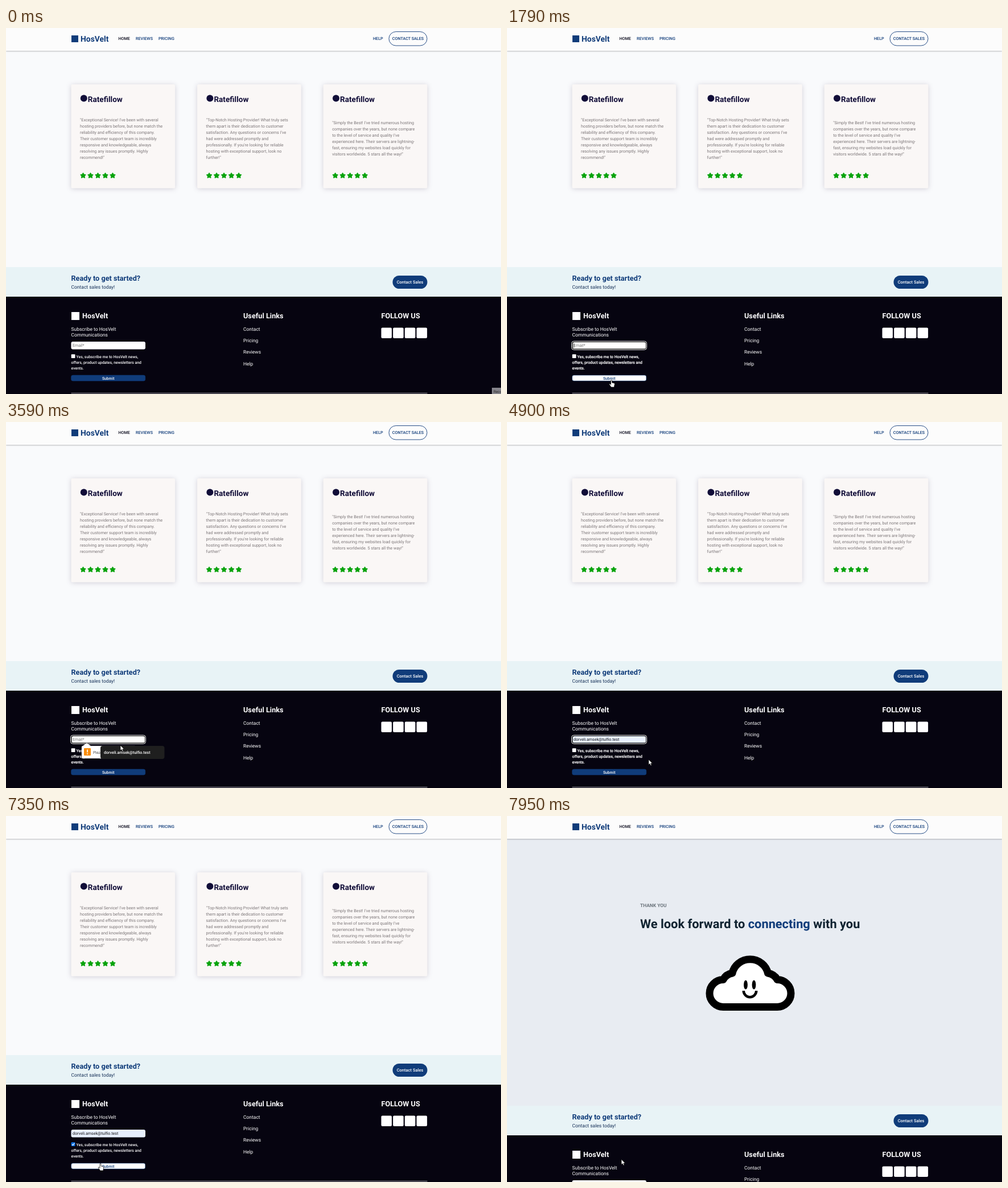
Animation, 870 px wide and 643 px high, one loop 8 s. Source, as an HTML page:

```html
<!DOCTYPE html>
<html lang="en">
<head>
<meta charset="utf-8">
<title>Sign-up form</title>
<style>
  html, body { margin: 0; width: 100%; height: 100%; overflow: hidden; background: #f9fafc; }
  svg { display: block; font-family: Roboto, sans-serif; text-rendering: geometricPrecision; }
  .blue { fill: #103c7a; }
  .white { fill: #fff; }
  .nav { font-size: 7.2px; font-weight: 500; }
  .brand { font-size: 13.9px; font-weight: 700; }
  .title { font-size: 12.7px; font-weight: 700; }
  .body { font-size: 8.48px; }
  .review { font-size: 7.3px; fill: #7c7678; }
  .label { font-size: 6.85px; font-weight: 500; stroke: #fff; stroke-width: 0; }
  .field { font-size: 7.1px; }
  .card { fill: #faf7f6; filter: drop-shadow(0 1px 4px #2d143830); }
  #header rect:first-child { filter: drop-shadow(0 1px 1px #0004); }
</style>
</head>
<body>
<svg width="870" height="643" viewBox="0 0 870 643">
  <rect width="870" height="643" fill="#f9fafc"/>
  <g id="cards"></g>

  <g id="thanks">
    <rect y="40" width="870" height="470" fill="#e8ecf2"/>
    <g id="message">
      <text x="234" y="160" font-size="8.4" font-weight="700" fill="#6c757d">THANK YOU</text>
      <text x="234" y="197" font-size="21.8" font-weight="700" fill="#0f2230">We look forward to <tspan class="blue">connecting</tspan> with you</text>
    </g>
    <g id="cloud" stroke="#000" fill="none">
      <path d="M380 335.5a24 24 0 0 1 0-48Q385 278 396 276A32 31 0 0 1 458.5 276Q470 278 475 287.5a24 24 0 0 1 0 48Z" fill="#fff" stroke-width="13" stroke-linejoin="round"/>
      <path d="M415.8 307a11.2 11.2 0 0 0 22.4 0" stroke-width="4.5"/>
      <g fill="#000" stroke="none">
        <ellipse cx="419.5" cy="296.5" rx="3.4" ry="8"/>
        <ellipse cx="434" cy="296.5" rx="3.4" ry="8"/>
      </g>
    </g>
  </g>

  <g id="header">
    <rect width="870" height="40" fill="#fcfcfc"/>
    <rect class="blue" x="115" y="13" width="12" height="12"/>
    <text class="blue brand" x="131" y="24">HosVelt</text>
    <g class="blue nav">
      <text x="197.5" y="21.4" fill="#0a0a1c">HOME</text>
      <text x="228" y="21.4">REVIEWS</text>
      <text x="268" y="21.4">PRICING</text>
      <text x="645" y="21.4">HELP</text>
      <text x="706.5" y="21.4" text-anchor="middle">CONTACT SALES</text>
    </g>
    <rect x="673" y="6.5" width="67" height="24.5" rx="12.2" fill="none" stroke="#103c7a" stroke-width=".9"/>
  </g>

  <g id="lower">
    <rect y="420" width="870" height="52" fill="#e8f3f6"/>
    <text class="blue title" x="114.5" y="444">Ready to get started?</text>
    <text class="body" x="114.5" y="458" fill="#163058">Contact sales today!</text>
    <rect class="blue" x="679.5" y="435" width="61" height="23" rx="11.5"/>
    <text class="white" x="710" y="449.4" font-size="7.5" font-weight="500" text-anchor="middle">Contact Sales</text>

    <rect y="472" width="870" height="171" fill="#060410"/>
    <g class="white">
      <rect x="115" y="499" width="14" height="14"/>
      <text class="title" x="134" y="510.3">HosVelt</text>
      <text class="title" x="417" y="510.3">Useful Links</text>
      <text class="title" x="659.5" y="510.3">FOLLOW US</text>
      <g class="body">
        <text x="114.5" y="531.7">Subscribe to HosVelt</text>
        <text x="114.5" y="541.5">Communications</text>
        <text x="417" y="531.7">Contact</text>
        <text x="417" y="552">Pricing</text>
        <text x="417" y="572.3">Reviews</text>
        <text x="417" y="592.6">Help</text>
      </g>
      <g id="social"></g>
      <g class="label" id="label">
        <text x="123.5" y="580">Yes, subscribe me to HosVelt news,</text>
        <text x="114.5" y="590">offers, product updates, newsletters and</text>
        <text x="114.5" y="600">events.</text>
      </g>
    </g>

    <rect id="ring" x="113.5" y="550.3" width="132" height="15" rx="4" fill="#000" stroke="#fff"/>
    <rect id="input" x="114.5" y="551" width="130.5" height="13.5" rx="3"/>
    <text id="value" class="field" x="117" y="560.2"></text>
    <rect id="caret" y="554" width=".7" height="8"/>

    <rect id="box" x="114.7" y="573.2" width="6.8" height="6.8" rx="1"/>
    <path id="tick" d="M116 576.6l1.6 1.7 2.7-3.4" fill="none" stroke="#fff" stroke-width="1.1"/>

    <rect id="button" x="114.6" y="610" width="130.2" height="10" rx="3" stroke="#103c7a" stroke-width=".6"/>
    <text id="submit" x="179.7" y="617.5" font-size="6.8" font-weight="500" text-anchor="middle">Submit</text>
    <rect x="114.5" y="641" width="626" height="1" fill="#9c9ba2"/>
  </g>

  <g id="warning">
    <path class="white" d="M135 569l7-5 7 5h77a2 2 0 0 1 2 2v18a2 2 0 0 1-2 2h-91a2 2 0 0 1-2-2v-18a2 2 0 0 1 2-2z" stroke="#999" stroke-width=".4"/>
    <rect x="137" y="573" width="12" height="13" rx="1" fill="#f88d0c"/>
    <path d="M143 575.5v5M143 582v1.8" stroke="#fff" stroke-width="1.7"/>
    <text x="153" y="582.5" font-size="6.6" font-family="Open Sans, sans-serif" fill="#333">Please fill out this field.</text>
  </g>
  <g id="suggestion">
    <rect x="166" y="569" width="112.5" height="23" rx="4" fill="#1f1f1f"/>
    <rect id="row" x="167" y="573" width="109" height="15" fill="#3b3b3d"/>
    <text id="offer" class="field white" x="172" y="583" font-weight="500"></text>
  </g>

  <g id="recorder">
    <rect x="854" y="632" width="16" height="11" fill="#85848b"/>
    <text x="857" y="641" font-size="6.4" fill="#222">Reco</text>
  </g>

  <g id="cursor" stroke-linejoin="round">
    <path id="arrow" d="M0 0v9.2l2.1-1.9 1.5 3.3 1.6-.7-1.4-3.2h2.9z" fill="#fff" stroke="#000" stroke-width=".7"/>
    <path id="hand" d="M-1 0q1-1.4 2 0v4l4 1q1 .4.8 2l-.8 3.5v1.5h-5.5l-3.3-5q-.3-1.5 1.2-1l1.6 1.4z" fill="#fff" stroke="#000" stroke-width=".7"/>
    <path id="beam" d="M-1.5-5h3M0-5v10M-1.5 5h3" stroke="#000" stroke-width=".8"/>
  </g>
</svg>

<script>
const $ = id => document.getElementById(id);
const show = (id, on) => $(id).style.display = on ? "" : "none";
const fill = (id, color) => $(id).setAttribute("fill", color);
const EMAIL = "dorveli.amsek@tulfio.test";

const reviews = [
  ['"Exceptional Service! I\'ve been with several', "hosting providers before, but none match the",
   "reliability and efficiency of this company.", "Their customer support team is incredibly",
   "responsive and knowledgeable, always", "resolving any issues promptly. Highly", 'recommend!"'],
  ['"Top-Notch Hosting Provider! What truly sets', "them apart is their dedication to customer",
   "satisfaction. Any questions or concerns I've", "had were addressed promptly and",
   "professionally. If you're looking for reliable", "hosting with exceptional support, look no", 'further!"'],
  ['"Simply the Best! I\'ve tried numerous hosting', "companies over the years, but none compare",
   "to the level of service and quality I've", "experienced here. Their servers are lightning-",
   "fast, ensuring my websites load quickly for", 'visitors worldwide. 5 stars all the way!"']
];

function star(cx, cy) {
  const points = Array.from({ length: 10 }, (_, i) => {
    const r = i % 2 ? 2.8 : 5, a = i * Math.PI / 5;
    return (cx + r * Math.sin(a)).toFixed(2) + "," + (cy - r * Math.cos(a)).toFixed(2);
  });
  return `<polygon points="${points.join(" ")}" fill="#07a30b" stroke="#07a30b" stroke-linejoin="round"/>`;
}

$("cards").innerHTML = reviews.map((lines, i) => {
  const top = 163.6 + (7 - lines.length) * 5.5;
  return `<g transform="translate(${114.5 + i * 221.6})">
    <rect class="card" y="99" width="182.7" height="182.5" rx="2"/>
    <circle cx="22.3" cy="123.5" r="6" fill="#110d38"/>
    <text x="29.3" y="129.8" font-size="13.6" font-weight="700" fill="#110d38">Ratefillow</text>
    ${lines.map((s, n) => `<text class="review" x="15.5" y="${top + n * 11}">${s}</text>`).join("")}
    ${[0, 1, 2, 3, 4].map(n => star(21 + n * 13, 259.4)).join("")}
  </g>`;
}).join("");

$("social").innerHTML = [0, 1, 2, 3].map(i =>
  `<rect x="${659.5 + i * 20.7}" y="526.5" width="18.5" height="18.5" rx="2"/>`).join("");
$("offer").textContent = EMAIL;

// time, x, y of the pointer
const path = [
  [70, 868, 636], [250, 700, 500], [450, 440, 477], [650, 260, 520], [860, 205, 573], [930, 200, 580],
  [1040, 190, 611], [1260, 183.5, 619], [1950, 183.5, 619], [2200, 205, 590], [2520, 195, 558],
  [3050, 195, 556], [3390, 195, 556], [3590, 201, 568], [3910, 208, 579], [4250, 208, 579],
  [4900, 249, 593], [5030, 240, 595], [5250, 190, 606], [5560, 117, 577], [6150, 117, 577],
  [6490, 162, 608], [6620, 161, 610.3], [7220, 161, 610.3], [7350, 166, 611], [7549, 166, 611],
  [7550, 165.5, 608.5], [7840, 165.5, 608.5], [7950, 201, 603.3], [8000, 201, 603.3]
];

function pointer(t) {
  const i = Math.max(1, path.findIndex(p => p[0] > t));
  const [t0, x0, y0] = path[i - 1], [t1, x1, y1] = path[i];
  const k = Math.max(0, (t - t0) / (t1 - t0));
  return [x0 + (x1 - x0) * k, y0 + (y1 - y0) * k];
}

function draw(t) {
  const between = (a, b) => t >= a && t < b;
  const sent = t >= 7550, loaded = t >= 7690;
  const focused = between(1720, 6090);
  const filled = between(4180, 7550), preview = between(3780, 4180);
  const checked = between(6090, 7550);
  const [x, y] = pointer(t);
  const over = (top, bottom) => !sent && x > 114 && x < 245 && y >= top && y <= bottom;
  const onButton = over(610, 620), onInput = over(551, 564.5);

  show("recorder", t < 70);
  show("cards", !sent);
  show("thanks", sent);
  show("cloud", loaded);
  $("message").setAttribute("transform", `translate(0 ${loaded ? 0 : 79})`);
  $("lower").setAttribute("transform", `translate(0 ${sent ? 89 : 0})`);

  show("ring", focused);
  $("input").setAttribute("transform", focused ? "translate(179.75 557.75) scale(.985 .87) translate(-179.75 -557.75)" : "");
  fill("input", filled || preview ? "#e8f0fe" : "#fff");
  $("value").textContent = filled || preview ? EMAIL : "Email*";
  fill("value", filled || preview ? "#111" : "#757575");
  $("caret").setAttribute("x", filled ? 197.3 : 117);
  show("caret", between(1720, 2250) || between(2750, 3550) || between(4330, 4830) || between(5330, 5830));
  $("label").style.strokeWidth = focused ? .15 : 0;

  fill("box", checked ? "#0b72e7" : "#fff");
  show("tick", checked);
  fill("button", onButton ? "#fff" : "#103c7a");
  fill("submit", onButton ? "#103c7a" : "#fff");

  show("warning", between(1860, 4180));
  show("suggestion", between(3050, 4180));
  show("row", preview);

  show("cursor", t >= 70);
  $("cursor").setAttribute("transform", `translate(${x} ${y})`);
  show("hand", onButton);
  show("beam", onInput);
  show("arrow", !onButton && !onInput);
}

function frame() {
  draw(performance.now() % 8000);
  requestAnimationFrame(frame);
}
frame();
</script>
</body>
</html>
```
